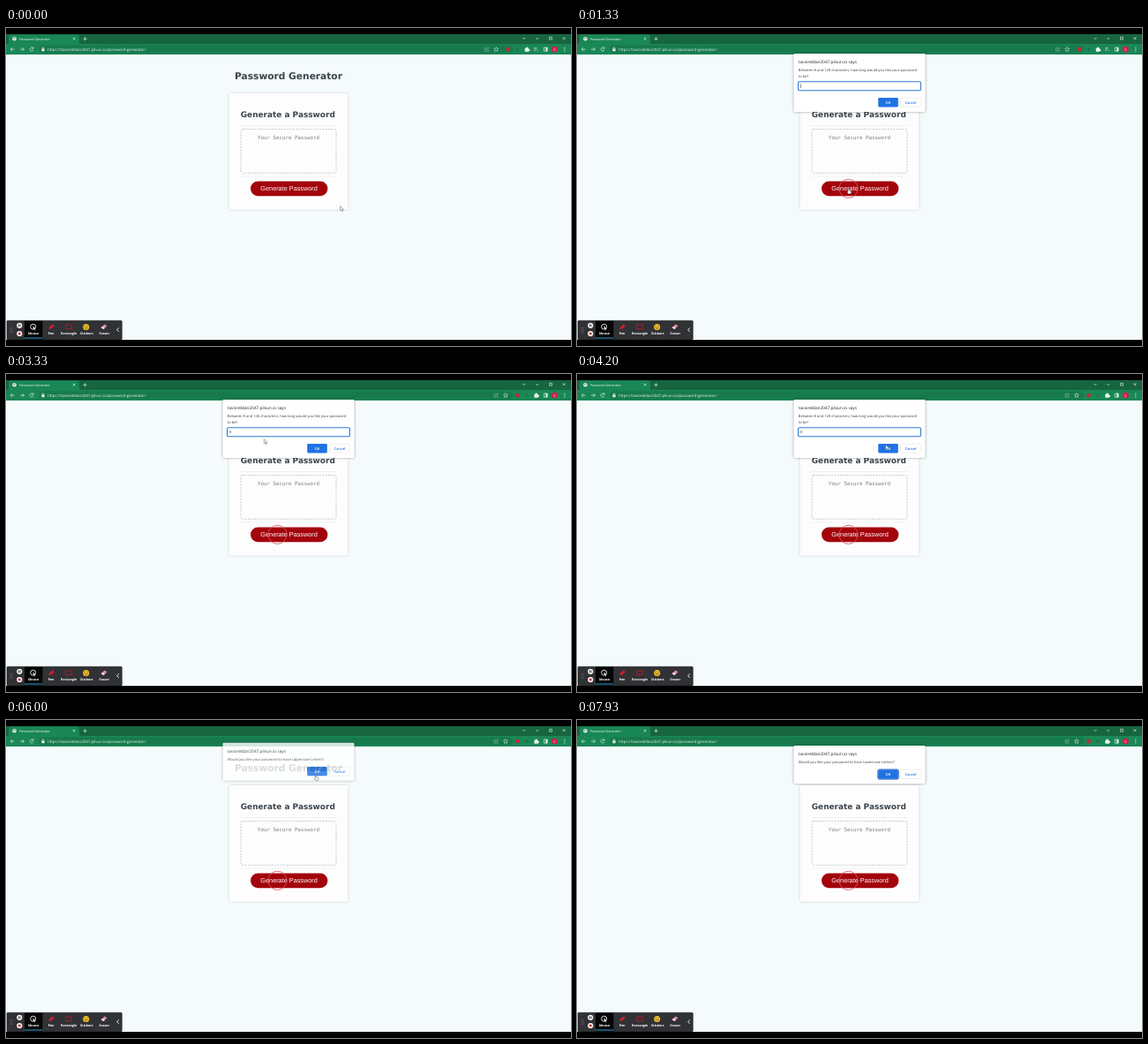
Write an HTML page that moves like this. It is 640 px wide and 360 px high and loops after 8000 ms.

```html
<!DOCTYPE html>
<html lang="en">
<head>
<meta charset="utf-8">
<title>Password Generator</title>
<style>
  html, body { margin: 0; width: 100%; height: 100%; overflow: hidden; background: #000; }
  svg { display: block; width: 640px; height: 360px; }
  text { font-family: "Open Sans", sans-serif; text-rendering: geometricPrecision; white-space: pre; }
  .head { font-family: "DejaVu Sans", sans-serif; font-weight: 700; fill: #3b444b; }
  .mono { font-family: "DejaVu Sans Mono", monospace; fill: #7d7d7d; }
  .btn { font-family: "Liberation Sans", sans-serif; fill: #fff; }
  .mid { text-anchor: middle; }
  .tool { font-size: 3.7px; font-weight: 700; fill: #fff; text-anchor: middle; }
  .line { fill: none; stroke: #dcece4; stroke-width: .7; }
  .card { filter: drop-shadow(0 .7px 1.3px rgba(0, 0, 0, .2)); }
  .box { filter: drop-shadow(0 .8px 1.6px rgba(0, 0, 0, .38)); }
  .cursor { fill: #fff; stroke: #5c5c5c; stroke-width: .5; stroke-linejoin: round; }
</style>
</head>
<body>
<svg viewBox="0 0 640 360">
  <!-- page -->
  <rect y="30" width="640" height="323" fill="#f5fbfc"/>
  <text class="head mid" x="320" y="57.8" font-size="10.65">Password Generator</text>
  <rect class="card" x="252.5" y="74" width="135" height="131.7" rx="1.7" fill="#fdfdfe"/>
  <text class="head mid" x="319.3" y="100.6" font-size="8.95">Generate a Password</text>
  <path d="M265.5 110.5H374.5M265.5 168H374.5" stroke="#ebebed" stroke-width=".7"/>
  <rect x="266" y="114.6" width="108" height="49.6" rx="2" fill="none" stroke="#b2b6b9" stroke-width=".75" stroke-dasharray="2 1.35"/>
  <text class="mono mid" x="320" y="126" font-size="5.83">Your Secure Password</text>
  <rect x="277" y="173.5" width="87.4" height="16.7" rx="8.35" fill="#a3040c"/>
  <text class="btn mid" x="320.6" y="184.1" font-size="7.3">Generate Password</text>
  <circle id="ring" cx="307.5" cy="181.8" fill="none" stroke="#dd5560" stroke-width="1" opacity=".85"/>

  <!-- browser frame -->
  <rect width="640" height="7" fill="#000"/>
  <rect y="7" width="640" height="11.5" fill="#176540"/>
  <path d="M1 18.5Q3 18.5 3 16V9.5Q3 7.5 5 7.5H81Q83 7.5 83 9.5V16Q83 18.5 85 18.5Z" fill="#1a8756"/>
  <rect y="18" width="640" height="12" fill="#1a8756"/>
  <rect x="37" y="19.6" width="537" height="9" rx="4.5" fill="#177a4d"/>
  <circle cx="9.5" cy="12.3" r="2.3" fill="#e6efea"/>
  <path d="M8 11.2l1.5.6-.4 1.4M10.2 10.5l.7 1.2" fill="none" stroke="#37705a" stroke-width=".6"/>
  <text x="15" y="13.6" font-size="3.68" fill="#fff">Password Generator</text>
  <path class="line" d="M75.8 10.8l2.6 2.6m0-2.6l-2.6 2.6M89.5 10.2v4.2m-2.1-2.1h4.2"/>
  <path class="line" d="M585.5 11l1.5 1.5 1.5-1.5M600.3 12h3M615.6 10.3h2.8v2.8h-2.8zM630.6 10.3l2.8 2.8m0-2.8l-2.8 2.8"/>
  <path class="line" d="M9.6 24.1H5.2m2-2l-2 2 2 2M16 24.1h4.4m-2-2l2 2-2 2"/>
  <path class="line" d="M30.5 22.6a2 2 0 1 0 .5 2.2M31 21.4v1.8h-1.8"/>
  <path class="line" d="M40.9 23.8v-.7a1.1 1.1 0 0 1 2.2 0v.7"/>
  <rect x="40.4" y="23.6" width="3.2" height="2.6" rx=".3" fill="#e4f1ea"/>
  <text id="url" x="47" y="25.7" font-size="4.42" fill="#e9f4ee"></text>
  <g id="tools">
    <path class="line" opacity=".5" d="M543.8 22.3h-1.3v3.8h4v-1.2M543.9 24.8q.2-2 2.7-2m-1-1.1l1.1 1.1-1.1 1.1"/>
    <path class="line" opacity=".8" d="M555.3 21.6l.7 1.6 1.8.2-1.3 1.2.4 1.8-1.6-.9-1.6.9.4-1.8-1.3-1.2 1.8-.2z"/>
    <circle cx="568.9" cy="24.1" r="2.4" fill="#c82638"/>
    <circle cx="579.5" cy="24.1" r="1.6" fill="#1c734c"/>
    <path d="M587.8 22.8h1.4a.9.9 0 1 1 1.7 0h1.3v1.3a.9.9 0 1 1 0 1.7v.9h-4.4z" fill="#eef6f2"/>
  </g>
  <path id="media" class="line" opacity=".8" d="M598.2 22.4h3.4m-3.4 1.5h3.4m-3.4 1.5h1.8m2.2-.6v1.6"/>
  <path class="line" d="M609.4 22h3.8v4.2h-3.8z"/><rect x="611.4" y="22" width="1.8" height="4.2" fill="#e4f1ea"/>
  <circle cx="621.4" cy="24.1" r="3.4" fill="#d81b50"/>
  <text class="mid" x="621.4" y="25.5" font-size="3.8" fill="#fff">S</text>
  <path d="M632.3 21.8h1v1h-1zM632.3 23.6h1v1h-1zM632.3 25.4h1v1h-1z" fill="#e4f1ea"/>

  <!-- recorder bar -->
  <rect y="353" width="640" height="7" fill="#000"/>
  <rect x="1" y="331.3" width="130.3" height="21.6" rx="1" fill="#313235" stroke="#1b1b1d" stroke-width=".6"/>
  <rect x="21" y="331.6" width="20.4" height="21" fill="#050506"/>
  <rect x="21" y="350.4" width="20.4" height="1.2" fill="#2287ad"/>
  <path d="M5.2 339v6.4M7 339v6.4" stroke="#85868a" stroke-width=".8" stroke-dasharray=".8 1"/>
  <circle cx="15.3" cy="336.8" r="3.1" fill="#f4f4f4"/>
  <path d="M14.5 335.4v2.8M16.1 335.4v2.8" stroke="#222" stroke-width=".8"/>
  <circle cx="15.3" cy="346" r="3.1" fill="#f4f4f4"/>
  <rect x="14" y="344.7" width="2.6" height="2.6" rx=".4" fill="#d2202c"/>
  <circle cx="30.7" cy="338.2" r="3" fill="none" stroke="#eee" stroke-width=".9"/>
  <path d="M30.6 337.3v4.8l1.1-1 .7 1.3.8-.4-.7-1.3h1.4z" fill="#fff" stroke="#050506" stroke-width=".3"/>
  <path d="M48.2 340.8l.8-2 3.7-3.3 2.1 1.7-3.7 3.3z" fill="#d81f32"/>
  <rect x="67.8" y="336" width="6.4" height="4.6" fill="none" stroke="#b01c2b" stroke-width=".9"/>
  <circle cx="90.7" cy="338.4" r="3.5" fill="#f0c02d"/>
  <path d="M88.7 337.3h1.2m1.6 0h1.2M88.9 339.2q1.8 1.9 3.6 0" fill="none" stroke="#4d3810" stroke-width=".7"/>
  <path d="M107.6 339.2l4-3.8 2.9 1.8-4 3.9z" fill="#e88b9c"/>
  <path d="M107.6 339.2l1.6-1.5 2.9 1.8-1.6 1.6z" fill="#f2dce0"/>
  <g id="labels"></g>
  <path d="M127.7 339.4l-2 2.2 2 2.2" fill="none" stroke="#fff" stroke-width=".9"/>

  <!-- dialog -->
  <g id="dialog">
    <rect id="pane" class="box" x="245.5" y="29" width="149" rx="1.4" fill="#fff"/>
    <text id="host" x="250.8" y="40.1" font-size="4.72" fill="#202124"></text>
    <g font-size="4.09" fill="#3c4043">
      <text id="ask" x="250.8" y="49.2"></text>
      <g id="entry">
        <text x="250.8" y="55.9">to be?</text>
        <rect x="250.6" y="60.7" width="138.8" height="10.1" rx="1.2" fill="#fff" stroke="#2b78d8" stroke-width="1.1"/>
        <text id="typed" x="253" y="67.2">8</text>
        <path id="caret" d="M253.6 63.1v5.2" stroke="#222" stroke-width=".5"/>
      </g>
    </g>
    <g id="buttons">
      <rect id="focus" x="340.8" y="-.3" width="23.4" height="11" rx="1.6" fill="none" stroke="#1a4fb4" stroke-width=".9"/>
      <rect x="341.2" width="22.6" height="10.4" rx="1.3" fill="#1f73e3"/>
      <rect x="366.7" y=".2" width="22.4" height="10" rx="1.3" fill="#fff" stroke="#dadde2" stroke-width=".5"/>
      <g class="mid" font-size="4.05" font-weight="600">
        <text x="352.5" y="6.7" fill="#fff">OK</text>
        <text x="377.9" y="6.7" fill="#2a72dc">Cancel</text>
      </g>
    </g>
  </g>

  <g id="cursor" class="cursor">
    <path id="arrow" d="M0 0V5.2L1.2 4.1 2.1 6.1 3 5.7 2.1 3.8H3.8Z"/>
    <path id="hand" d="M-.6 .5Q0-.4.6.5V2.6L2.6 3.1Q3.2 3.3 3 4.1L2.6 6.2H-.2L-1.8 4.1Q-1.6 3.3-.6 4.2Z"/>
  </g>
</svg>
<script>
const LOOP = 8000;
const HOST = "tavioreldan2047.pilvun.io";
const $ = id => document.getElementById(id);
const set = (id, attrs) => { for (const k in attrs) $(id).setAttribute(k, attrs[k]); };
const show = (id, on) => set(id, { visibility: on ? "inherit" : "hidden" });
const ramp = (t, a, b) => Math.min(1, Math.max(0, (t - a) / (b - a)));
const ease = p => p * p * (3 - 2 * p);

$("url").textContent = `https://${HOST}/password-generator/`;
$("host").textContent = `${HOST} says`;
["Mouse", "Pen", "Rectangle", "Stickers", "Eraser"].forEach((name, i) => {
  const label = document.createElementNS("http://www.w3.org/2000/svg", "text");
  label.setAttribute("class", "tool");
  label.setAttribute("x", 31 + i * 20.1);
  label.setAttribute("y", 346.8);
  label.textContent = name;
  $("labels").append(label);
});

const confirmText = kind => `Would you like your password to have ${kind} Letters?`;
const dialogs = [
  { open: 1000, close: 4330, prompt: true, text: "Between 8 and 128 characters, how long would you like your password" },
  { open: 4600, close: 5940, text: confirmText("Uppercase") },
  { open: 6200, close: Infinity, text: confirmText("Lowercase") }
];

// start, end, x, y
const moves = [
  [60, 660, 307.6, 181.5],
  [1660, 2330, 292.3, 73.6],
  [3730, 4130, 349.6, 80.2],
  [4400, 4530, 349.6, 83.6],
  [5200, 5530, 351, 62.2],
  [7130, 7460, 356, -10]
];

function drawCursor(t) {
  let x = 378.6, y = 201.6;
  for (const [a, b, toX, toY] of moves) {
    const p = ease(ramp(t, a, b));
    x += (toX - x) * p;
    y += (toY - y) * p;
  }
  const onButton = x < 364 && y > 173 && y < 190;
  const hand = onButton || t >= 4470;
  set("cursor", { transform: `translate(${x} ${y})` });
  show("arrow", !hand);
  show("hand", hand);
}

function drawDialog(t) {
  const d = dialogs.find(d => t >= d.open && t < d.close + 200);
  show("dialog", d);
  if (!d) return;
  const closing = t >= d.close;
  const gone = closing ? ramp(t, d.close, d.close + 200) : 1 - ramp(t, d.open, d.open + 200);
  set("dialog", { opacity: 1 - gone ** 1.4, transform: `translate(0 ${-11 * gone})` });
  set("pane", { height: d.prompt ? 66 : 43 });
  set("buttons", { transform: `translate(0 ${d.prompt ? 79 : 56.3})` });
  $("ask").textContent = d.text;
  show("entry", d.prompt);
  show("focus", !d.prompt && !closing);
  show("typed", d.prompt && t >= 3130);
  show("caret", d.prompt && t < 2730);
}

function draw(t) {
  set("ring", { r: 10.6 * ease(ramp(t, 940, 1130)) });
  show("ring", t > 940);
  const shifted = t >= 1460;
  show("media", !shifted);
  set("tools", { transform: `translate(${shifted ? 10.6 : 0} 0)` });
  drawDialog(t);
  drawCursor(t);
}

const start = performance.now();
function tick() {
  draw((performance.now() - start) % LOOP);
  requestAnimationFrame(tick);
}
tick();
</script>
</body>
</html>
```
